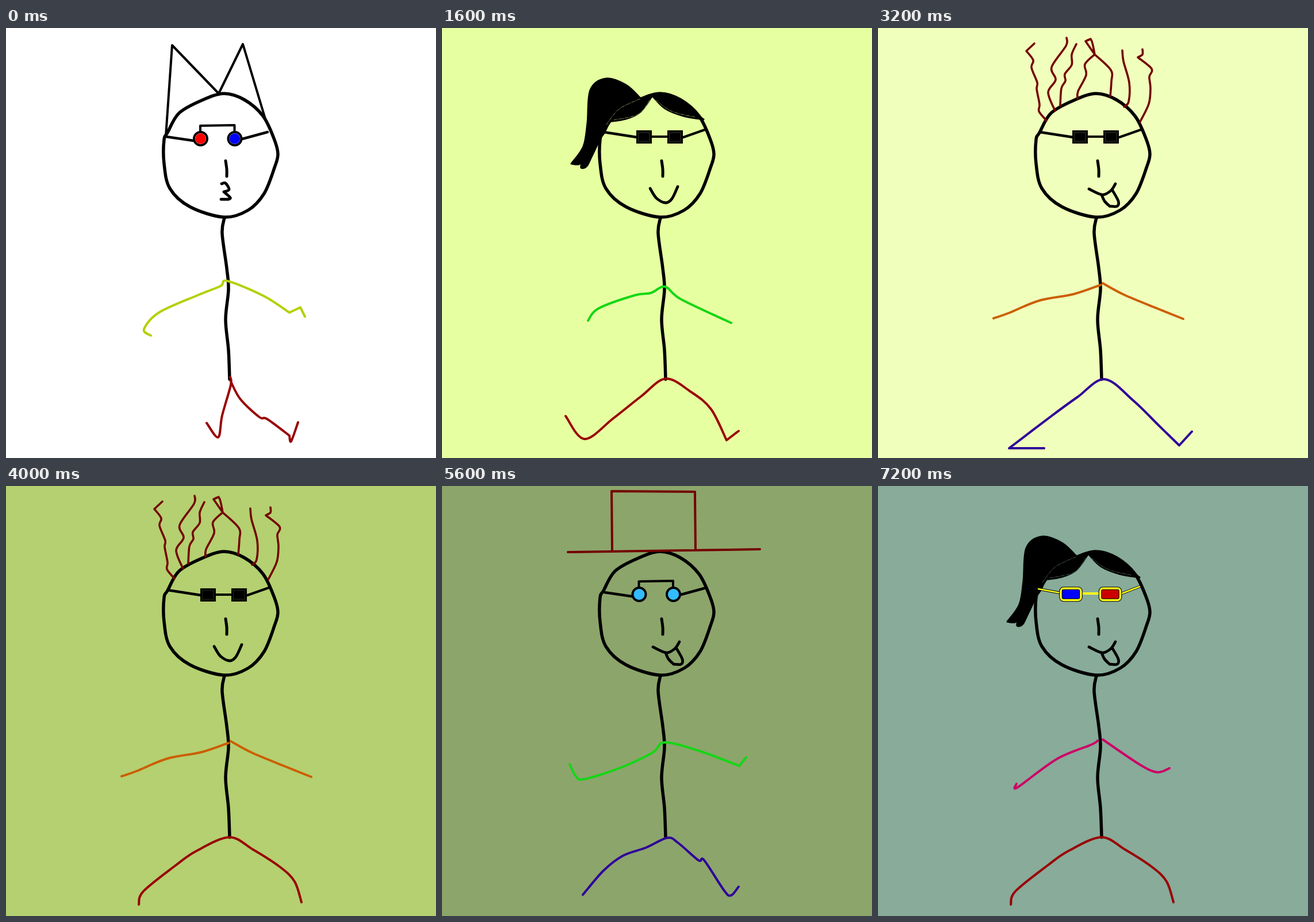
Animation of 748x748 px, one loop 8 s. Source, as an HTML page:

```html
<!DOCTYPE html>
<html lang="en">
<head>
<meta charset="utf-8">
<title>Mix and match stick figure</title>
<style>
  html, body { margin: 0; width: 100%; height: 100%; overflow: hidden; }
  svg { display: block; width: 100%; height: 100%; }
</style>
</head>
<body>
<svg id="stage" viewBox="0 0 748 748" fill="none" stroke-linecap="round" stroke-linejoin="round"></svg>
<script>
const HOLD = 800;
const stage = document.getElementById('stage');

// Smooth curve through points; it closes when the first and last agree.
function spline(p, move) {
  const loop = p.length > 2 && String(p[0]) === String(p.at(-1));
  let d = move ? 'M' + p[0] : '';
  for (let k = 0; k < p.length - 1; k++) {
    const b = p[k], c = p[k + 1];
    const a = p[k - 1] || (loop ? p.at(-2) : b);
    const e = p[k + 2] || (loop ? p[1] : c);
    const from = b.map((v, i) => v + (c[i] - a[i]) / 6);
    const to = c.map((v, i) => v - (e[i] - b[i]) / 6);
    d += `C${from} ${to} ${c}`;
  }
  return d;
}

// Key points to a path: "/" is a sharp corner, "|" lifts the pen.
function sketch(text) {
  return text.split('|').map(run => {
    let last = [];
    return run.split('/').map((part, i) => {
      const p = part.trim().split(/\s+/).map(s => s.split(',').map(Number));
      const path = spline([...last, ...p], i === 0);
      last = p.slice(-1);
      return path;
    }).join('');
  }).join('');
}

const line = (text, color = '#000', width = 4, extra = '') =>
  `<path d="${sketch(text)}" stroke="${color}" stroke-width="${width}" ${extra}/>`;
const dot = (x, y, r, fill, extra = '') =>
  `<circle cx="${x}" cy="${y}" r="${r}" fill="${fill}" ${extra}/>`;
const box = (x, y, w, h, fill, extra = '') =>
  `<rect x="${x}" y="${y}" width="${w}" height="${h}" fill="${fill}" ${extra}/>`;

const wine = '#730000', crimson = '#990000', scarlet = '#ff0000', violet = '#2e0099';
const green = '#14d714', olive = '#b4d000', orange = '#cc5e00', pink = '#cc0066', yellow = '#ffff1a';

const body =
  line('275,194 275,236 285,279 320,311 379,329 421,317 449,288 467,243 473,219 466,192 447,153 415,125 379,114 340,126 301,148 281,182 275,194', '#000', 5.5) +
  line('380,330 376,357 384,418 387,455 382,507 387,560 389,611', '#000', 5.5) +
  line('382,231 384,246 384,258', '#000', 5);

const hats = {
  ears: () => line('278,188 / 289,30 / 370,114 / 412,28 / 451,158'),
  pony: bg =>
    line('345,122 320,99 285,88 258,108 253,165 246,206 225,236 / 238,237 244,230 / 242,243 252,240 262,220 286,173 319,133 345,122' +
      '| 288,163 320,158 345,146 365,119 / 340,126 301,148 288,163' +
      '| 365,117 388,140 420,153 455,159 / 447,153 415,125 379,114 365,117', '#000', 3, 'fill="#000"') +
    line('286,168 308,141 345,123 | 299,160 341,150 362,124 | 372,126 400,145 440,155', bg, .8,
      'stroke-dasharray="5 2 1 2" opacity=".7"'),
  hair: () => line(
    '272,27 / 258,40 / 270,56 267,69 277,95 276,106 281,133 280,145 293,161' +
    '| 328,17 327,31 302,68 309,90 296,112 308,144' +
    '| 345,28 337,46 337,64 325,80 326,92 319,105 317,135' +
    '| 370,19 / 361,23 / 377,46 / 360,63 362,82 348,110 347,123' +
    '| 361,23 / 371,21 377,46 / 405,73 406,93 404,119' +
    '| 425,39 427,58 437,95 436,128 428,137' +
    '| 460,37 460,46 452,51 / 476,71 472,85 474,105 471,132 456,163', wine, 3.6),
  bowler: () => line('440,111 434,82 389,20 350,17 301,67 295,115 / 340,109 475,110 495,113', wine) +
    dot(511, 111.5, .7, wine),
  top: () => line('296,113 / 295,9 / 440,10 / 441,111 | 219,115 / 553,110', wine),
  party: () => line('299,151 / 352,11 / 440,143') +
    line('354,11 371,9 397,20 399,28 | 355,14 372,27 396,35 | 395,32 364,10 / 371,9 379,25 397,36', '#000', 3)
};
const cone = line('352,11 / 440,143 / 415,125 379,114 340,126 299,151', 'none', 0, 'fill="#e6ff14"');

const temples = line('281,181 / 339,190 | 420,190 / 457,177', '#000', 4.5);
const rounds = (left, right, ring) =>
  line('338,179 / 338,170 / 397.5,169 / 397.5,178') +
  line('278,189 / 326,196 | 411,193 / 455,181', '#000', 4.5) +
  [[338.5, left], [398, right]].map(([x, fill]) =>
    dot(x, 192.5, 11.5, ring, 'stroke="#000" stroke-width="4"') + dot(x, 192.5, 9.3, fill)).join('');

const eyes = {
  round: () => rounds('#f00', '#00f', '#fff'),
  sky: () => `<g transform="translate(4.5 -4)">${rounds('#3bf', '#3bf', '#3bf')}</g>`,
  dark: bg => temples + line('365,189 / 392,189') + [338, 392].map(x =>
    box(x, 178, 27, 23, '#000') +
    box(x + 4, 182, 19, 15, 'none', `stroke="${bg}" stroke-width=".6" opacity=".35"`)).join(''),
  magenta: () => temples + line('373,191 / 389,190') + [[340, 181], [390, 180]].map(([x, y]) =>
    box(x, y, 33, 23, '#e600ff', 'stroke="#000" stroke-width="4" stroke-linejoin="miter"')).join(''),
  cinema: () => {
    const sides = '279,179 / 317,186 | 424,187 / 455,175';
    const rim = (x, fill, color, width) =>
      box(x, 178, 35, 20.5, fill, `rx="5" stroke="${color}" stroke-width="${width}"`);
    return line(sides, '#000', 4.5) + line(sides, yellow, 2.6) + line('354,187 / 385,187', yellow) +
      [[318, '#00f'], [386.5, '#c00']].map(([x, fill]) =>
        rim(x, fill, '#000', 5.6) + rim(x, 'none', yellow, 3.4)).join('');
  },
  dots: () => dot(344, 192, 9, '#000') + dot(407.5, 192, 9, '#000')
};

const mouths = {
  kiss: '375,271 382,270 388,281 379,285 / 390,295 387,298 / 374,298',
  grin: '362,279 373,296 389,304 400,297 410,276',
  tongue: '367,280 390,290 405,283 413,271 | 389,290 394,301 403,310 / 416,310 418,301 407,281',
  frown: '353,296 351,288 358,282 394,281 399,285 401,298',
  smile: '345,274 362,286 382,291 402,286 418,276'
};

const arms = {
  hook: [olive, '252,535 240,524 266,495 333,465 373,449 385,440 448,466 493,495 / 512,486 / 520,502'],
  bent: [green, '254,509 272,488 335,465 363,461 388,450 416,472 503,513'],
  wide: [orange, '201,505 227,496 281,474 340,463 387,447 | 391,444 428,464 486,488 531,506'],
  wave: [green, '222,484 233,505 247,510 308,491 366,464 388,446 451,462 517,487 / 529,472'],
  lean: [olive, '208,512 298,475 384,441 | 386,436 422,459 493,519 / 508,508'],
  rosy: [pink, '241,518 / 243,524 311,475 371,450 382,443 | 391,441 456,485 486,498 507,491']
};

const legs = {
  step: [crimson, '349,687 / 369,712 376,674 391,621 390,607 | 391,615 408,646 441,677 454,680 493,709 / 496,719 508,686'],
  run: [crimson, '215,675 / 248,715 298,679 346,641 389,610 433,633 468,663 495,717 / 516,701'],
  stride: [violet, '289,731 / 228,731 / 303,674 347,642 394,611 444,648 488,691 524,726 / 546,702'],
  kick: [scarlet, '309,633 325,666 / 340,658 355,638 392,610 455,649 519,714 / 544,666 561,648'],
  bow: [violet, '245,711 281,669 315,643 355,629 392,612 411,621 446,651 456,651 491,704 503,712 516,697'],
  skip: [violet, '299,697 303,704 315,707 / 310,703 325,691 358,650 390,604 | 390,610 426,645 447,697 465,711 481,699'],
  arch: [crimson, '231,728 239,705 295,660 331,635 388,611 429,632 477,663 502,688 514,724']
};

const looks = [
  ['#ffffff', 'ears', 'round', 'kiss', 'hook', 'step'],
  ['#f2ffd0', 'bowler', 'dark', 'smile', 'wide', 'stride'],
  ['#e6ffa0', 'pony', 'dark', 'grin', 'bent', 'run'],
  ['#f0ffbb', 'ears', 'round', 'smile', 'bent', 'arch'],
  ['#f0ffbb', 'hair', 'dark', 'tongue', 'wide', 'stride'],
  ['#b4d070', 'hair', 'dark', 'grin', 'wide', 'arch'],
  ['#b4d070', 'bowler', 'magenta', 'frown', 'wide', 'kick'],
  ['#8ca56b', 'top', 'sky', 'tongue', 'wave', 'bow'],
  ['#8cdf8c', 'party', 'dots', 'smile', 'lean', 'skip'],
  ['#88ab9a', 'pony', 'cinema', 'tongue', 'rosy', 'arch']
];

let shown = -1;

function draw(ms) {
  const i = Math.floor(ms / HOLD) % looks.length;
  if (i === shown) return;
  shown = i;
  const [bg, hat, eye, mouth, arm, leg] = looks[i];
  const limb = ([color, text]) => line(text, color);
  stage.innerHTML = box(0, 0, 748, 748, bg) + (hat === 'party' ? cone : '') + body +
    hats[hat](bg) + eyes[eye](bg) + line(mouths[mouth], '#000', 4.8) +
    limb(arms[arm]) + limb(legs[leg]);
}

const start = performance.now();
function tick() {
  draw(performance.now() - start);
  requestAnimationFrame(tick);
}
tick();
</script>
</body>
</html>
```
